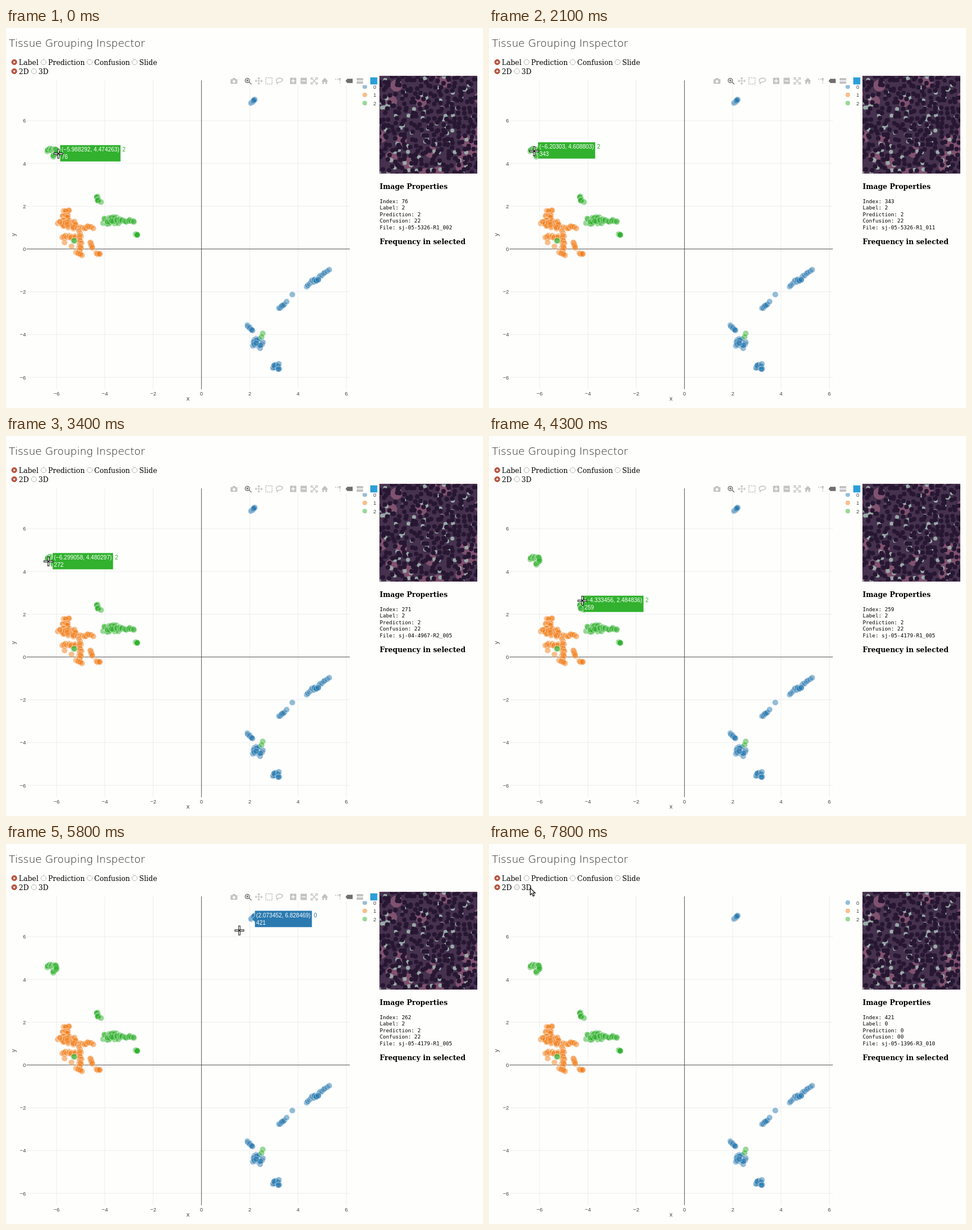
An HTML page that plays this animation: 838x668 px, repeating every 8000 ms.

```html
<!DOCTYPE html>
<html lang="en">
<head>
<meta charset="utf-8">
<title>Tissue Grouping Inspector</title>
<style>
html, body { margin: 0; width: 100%; height: 100%; overflow: hidden; background: #fefefd; }
svg { display: block; }
text { white-space: pre; }
.title { font: 200 18.4px "DejaVu Sans", sans-serif; fill: #222; }
.label { font: 12.3px "DejaVu Serif", serif; }
.head { font: bold 12.3px "DejaVu Serif", serif; }
.mono { font: 9.2px "DejaVu Sans Mono", monospace; }
.tick { font: 9.4px "Liberation Sans", Arial, sans-serif; fill: #444; }
.axis { font: 10.8px "Liberation Sans", Arial, sans-serif; fill: #444; }
.tip { font: 10px "Liberation Sans", Arial, sans-serif; }
</style>
</head>
<body>
<svg id="stage" width="838" height="668" viewBox="0 0 838 668"></svg>
<script>
const stage = document.getElementById('stage');
const GREEN = '#31b12e', ORANGE = '#f27f1c', BLUE = '#2a7ab0';
const COLORS = [BLUE, ORANGE, GREEN];

function add(parent, tag, attrs = {}, text) {
  const node = document.createElementNS('http://www.w3.org/2000/svg', tag);
  for (const key in attrs) node.setAttribute(key, attrs[key]);
  if (text !== undefined) node.textContent = text;
  parent.appendChild(node);
  return node;
}
const write = (parent, cls, x, y, text, more) =>
  add(parent, 'text', { class: cls, x, y, ...more }, text);
const line = (x1, y1, x2, y2, stroke) =>
  add(stage, 'line', { x1, y1, x2, y2, stroke, 'stroke-width': 0.9 });

function random(seed) {
  return () => {
    seed = (seed + 0x6D2B79F5) | 0;
    let v = Math.imul(seed ^ (seed >>> 15), 1 | seed);
    v = (v + Math.imul(v ^ (v >>> 7), 61 | v)) ^ v;
    return ((v ^ (v >>> 14)) >>> 0) / 4294967296;
  };
}

// Page header
write(stage, 'title', 5, 32.5, 'Tissue Grouping Inspector');
function radio(x, y, name, on) {
  const ring = add(stage, 'circle', {
    cx: x, cy: y, r: 4.6, fill: on ? '#bd5a45' : '#fbfbfa', stroke: on ? '#a8452f' : '#b4b2ae', 'stroke-width': 0.9
  });
  if (on) add(stage, 'circle', { cx: x, cy: y, r: 1.6, fill: '#fff' });
  write(stage, 'label', x + 8, y + 5, name);
  return ring;
}
radio(14.5, 60, 'Label', true);
radio(66, 60, 'Prediction');
radio(147, 60, 'Confusion');
radio(226, 60, 'Slide');
radio(14.5, 76, '2D', true);
const radio3d = radio(49, 76, '3D');

// Axes
const px = x => 343.4 + x * 42.43;
const py = y => 388.5 - y * 37.6;
const signed = n => String(n).replace('-', '−');
for (let v = -6; v <= 6; v += 2) {
  if (v) {
    line(px(v), 92, px(v), 635, '#ebebeb');
    line(36, py(v), 604, py(v), '#ebebeb');
  }
  write(stage, 'tick', px(v), 645.5, signed(v), { 'text-anchor': 'middle' });
  write(stage, 'tick', 35, py(v) + 3.4, signed(v), { 'text-anchor': 'end' });
}
line(px(0), 92, px(0), 635, '#444');
line(36, py(0), 604, py(0), '#444');
write(stage, 'axis', 319.8, 655, 'x', { 'text-anchor': 'middle' });
write(stage, 'axis', 0, 0, 'y', { transform: 'translate(16.5 366) rotate(-90)' });

// Markers: n points strewn along a line from x0, y0 to x1, y1
const rnd = random(11);
function strew(fill, lines) {
  const g = add(stage, 'g', { fill, stroke: '#fff', 'stroke-width': 0.8 });
  for (const [x0, y0, x1, y1, spread, n] of lines) {
    for (let i = 0; i < n; i++) {
      const f = i / (n - 1), a = rnd() * 2 * Math.PI, r = spread * Math.sqrt(rnd());
      add(g, 'circle', {
        cx: x0 + (x1 - x0) * f + r * Math.cos(a),
        cy: y0 + (y1 - y0) * f + r * Math.sin(a),
        r: 5.4, opacity: 0.5
      });
    }
  }
}
strew(BLUE, [
  [431, 132, 437, 126, 0.8, 8],
  [528, 454, 567, 426, 1.5, 14],
  [539, 444, 548, 441, 4, 14],
  [480, 493, 488, 486, 1, 8],
  [493, 481, 503, 468.5, 0, 2],
  [424, 523, 433, 532, 1, 9],
  [438, 553, 444, 557, 9, 23],
  [473, 595, 477, 595, 6, 15]
]);
strew(ORANGE, [
  [101, 322, 111, 322, 2, 6],
  [104, 326, 104, 342, 5, 20],
  [95, 342, 124, 348, 7, 30],
  [128, 351, 154, 350, 2.5, 11],
  [100, 367, 124, 366, 4, 14],
  [103, 377, 115, 384, 0, 2],
  [129, 358, 131, 396, 3, 22],
  [124, 394, 133, 399, 1, 4],
  [148, 376, 151, 386, 1, 6],
  [158, 396, 165, 397, 1, 6]
]);
strew(GREEN, [
  [73, 215, 89, 212, 2.5, 14],
  [83, 226, 88, 218, 2, 8],
  [160, 296, 161, 303, 2, 7],
  [161, 303, 167, 306, 0, 2],
  [176, 338, 193, 338, 8, 32],
  [195, 338, 224, 339, 2.5, 16],
  [228, 362, 231, 364, 0.8, 6],
  [119, 374, 120, 374, 0, 2],
  [451, 537, 449, 543, 0, 2]
]);

// Legend
COLORS.forEach((fill, i) => {
  add(stage, 'circle', { cx: 630.3, cy: 103 + i * 14.5, r: 4, fill, opacity: 0.5 });
  write(stage, 'tick', 645.3, 106.5 + i * 14.5, i);
});

// Toolbar
const GRAY = '#c3c3c3';
const bar = add(stage, 'g', { fill: 'none', stroke: GRAY, 'stroke-width': 1.5 });
add(bar, 'rect', { x: 392, y: 86, width: 262, height: 14.5, fill: '#fefefd', stroke: 'none' });
const icon = (x, d, more) => add(bar, 'path', { d, transform: `translate(${x} 93)`, ...more });
const block = (x, y, width, height, fill = GRAY) =>
  add(bar, 'rect', { x, y, width, height, fill, stroke: 'none' });
block(394.5, 90, 12, 8);
block(398, 88, 5, 3);
add(bar, 'circle', { cx: 400.5, cy: 94, r: 2.4, fill: '#fefefd', stroke: 'none' });
add(bar, 'circle', { cx: 424, cy: 92.2, r: 3.8, stroke: '#777' });
icon(425, 'M2 2L6 6M-3-.8h4M-1-2.8v4', { stroke: '#777' });
icon(444, 'M-6 0H6M0-6V6M-2-4L0-6L2-4M-2 4L0 6L2 4M-4-2L-6 0L-4 2M4-2L6 0L4 2', { 'stroke-width': 1.2 });
icon(462, 'M-5.5-5.5h11v11h-11z', { 'stroke-dasharray': '2.4 1.2' });
icon(480, 'M-3 3C-8-1-4-5 1-5S7-1 4 1S-2 2-3 3q-2 1 0 3');
block(499, 87.5, 11, 11);
icon(504.5, 'M-3.5 0h7M0-3.5v7', { stroke: '#fff' });
block(517.5, 87.5, 11, 11);
icon(523, 'M-3.5 0h7', { stroke: '#fff' });
icon(541.5, 'M-5.5-2v-3.5h3.5M2-5.5h3.5v3.5M5.5 2v3.5h-3.5M-2 5.5h-3.5v-3.5M-4-4L4 4M4-4L-4 4');
icon(560, 'M0-5.5L6 .5H4.2V5.5H1.3V2h-2.6v3.5h-2.9V.5H-6z', { fill: GRAY, stroke: 'none' });
icon(583, 'M-5-3H2M3.5-1V5', { 'stroke-dasharray': '2 1.4' });
block(584.5, 88, 3.5, 3.5);
icon(603, 'M-6.5 0l3-3.7h9.5v7.4h-9.5z', { fill: '#6f6f6f', stroke: 'none' });
block(616, 88, 11.5, 4.2);
block(616, 93.8, 11.5, 4.2);
block(640, 86.8, 12.3, 12.4, '#2b9fd9');

// Side panel pictures: [base, gaps, warm, cells, share of cells]
const TONES = [
  ['#54396a', '#b2bcc4', '#8a4a66', '#352047', 0.86],
  ['#573660', '#a4acba', '#95465f', '#351f47', 0.9],
  ['#543560', '#a4a6ba', '#8d4a66', '#341e45', 0.9],
  ['#6a4664', '#98a5b0', '#94607b', '#2f1c3e', 0.78],
  ['#674a68', '#9fb4b8', '#a56678', '#38233f', 0.86],
  ['#76485c', '#a39ba4', '#b06d76', '#3d2340', 0.76],
  ['#46324f', '#99aba9', '#805270', '#271732', 0.9]
];
const photos = TONES.map(([base, gaps, warm, cells, share], k) => {
  const r = random(50 + k);
  const box = add(stage, 'svg', { x: 656.5, y: 84.5, width: 171.5, height: 171 });
  add(box, 'rect', { width: 172, height: 172, fill: base });
  const dots = (step, stroke, width, odds) => {
    let d = '';
    for (let y = 0; y < 176; y += step)
      for (let x = 0; x < 176; x += step) {
        const dx = (r() - 0.5) * step * 0.9, dy = (r() - 0.5) * step * 0.9;
        if (r() < odds) d += `M${(x + dx).toFixed(1)} ${(y + dy).toFixed(1)}h.1`;
      }
    add(box, 'path', { d, stroke, 'stroke-width': width, 'stroke-linecap': 'round' });
  };
  dots(24, warm, 21, 0.5);
  dots(12, gaps, 7, 0.42);
  dots(9.2, cells, 8, share);
  return box;
});

write(stage, 'head', 656.5, 283, 'Image Properties');
const rows = Array.from({ length: 5 }, (_, i) => write(stage, 'mono', 656.5, 307.7 + i * 11.5, ''));
write(stage, 'head', 656.5, 380, 'Frequency in selected');

// Hover label
const tip = add(stage, 'g');
const tipBox = add(tip, 'path', { stroke: '#fff', 'stroke-width': 0.7 });
const tipPos = write(tip, 'tip', 8.2, -3.2, '', { fill: '#fff' });
const tipId = write(tip, 'tip', 8.2, 9.9, '', { fill: '#fff' });
const tipName = write(tip, 'tip', 0, -3.2, '');

// Pointers
const cross = add(stage, 'g', { fill: 'none', 'stroke-linecap': 'square' });
const arms = 'M-6.6 0H-2.4M2.4 0H6.6M0-6.6V-2.4M0 2.4V6.6';
add(cross, 'path', { d: arms, stroke: '#111', 'stroke-width': 3.6 });
add(cross, 'path', { d: arms, stroke: '#fff', 'stroke-width': 1.7 });
add(cross, 'circle', { r: 0.9, fill: '#111' });
const arrow = add(stage, 'path', {
  d: 'M.5.5V12.5L3.4 10L5.4 14.6L7.6 13.6L5.6 9.2H9.3Z', fill: '#fff', stroke: '#111', 'stroke-width': 1.2
});

// Timeline
const LOOP = 8000, STEP = 100;
// Pointer moves: [from time, to time, x, y]
const MOVES = [
  [0, 0, 92, 221], [400, 900, 80, 226], [1700, 2100, 79.5, 216.5], [2600, 3000, 76, 227],
  [3100, 3200, 74.5, 220.5], [3400, 3500, 93, 219], [3600, 3800, 174, 253], [3900, 4300, 164, 289.5],
  [4400, 4800, 161, 301.5], [4800, 4900, 161, 306], [5100, 5200, 162, 311], [5300, 5400, 174, 303],
  [5400, 5800, 410, 152], [5800, 6100, 433, 132], [6500, 6900, 190, 100], [6900, 7200, 76, 78],
  [7600, 7800, 72, 77]
];
// Hover labels: [time, x, y, index, label]
const TIPS = [
  [0, -5.988292, 4.474263, 76, 2], [700, -6.135417, 4.338912, 318, 2], [1900, -6.20303, 4.608803, 343, 2],
  [2800, -6.299058, 4.480297, 271, 2], [3200, -6.299058, 4.480297, 272, 2], [3500],
  [4100, -4.333456, 2.484836, 259, 2], [4600, -4.296004, 2.370204, 252, 2],
  [4900, -4.281547, 2.274183, 262, 2], [5200, -4.276213, 2.271846, 262, 2], [5400],
  [5800, 2.073452, 6.828469, 421, 0], [6600]
];
const PROPS = [
  [0, 76, 2, '05-5326-R1_002'], [800, 318, 2, '05-5326-R1_004'], [2000, 343, 2, '05-5326-R1_011'],
  [2900, 271, 2, '04-4967-R2_005'], [3500, 272, 2, '04-4967-R2_005'], [4200, 259, 2, '05-4179-R1_005'],
  [4700, 252, 2, '05-4179-R1_005'], [4900, 262, 2, '05-4179-R1_005'], [6000, 421, 0, '05-1396-R3_010']
];
// [time, picture, height of the part already loaded, picture beneath]
const PICTURES = [
  [0, 0], [1900, 1], [2100, 2, 26, 1], [2500, 2], [3000, 3], [4300, 0], [4800, 4], [5400, 5], [6100, 6]
];

const at = (table, t) => table.findLast(row => row[0] <= t);
const show = (node, on) => node.setAttribute('display', on ? 'inline' : 'none');

function pointer(t) {
  let x = 0, y = 0;
  for (const [from, to, x1, y1] of MOVES) {
    if (t < from) break;
    const f = t >= to ? 1 : (t - from) / (to - from);
    x += (x1 - x) * f;
    y += (y1 - y) * f;
  }
  return [x, y];
}

function drawTip([, x, y, id, k]) {
  show(tip, id !== undefined);
  if (id === undefined) return;
  tip.setAttribute('transform', `translate(${px(x)} ${py(y)})`);
  tipPos.textContent = `(${signed(x)}, ${signed(y)})`;
  tipId.textContent = id;
  const right = 8.2 + tipPos.getComputedTextLength() + 2.6;
  tipBox.setAttribute('d', `M0 0L5.6-5V-14.7H${right}V14.7H5.6V5Z`);
  tipBox.setAttribute('fill', COLORS[k]);
  tipName.textContent = k;
  tipName.setAttribute('x', right + 3);
  tipName.setAttribute('fill', COLORS[k]);
}

function draw(t) {
  drawTip(at(TIPS, t));

  const [, id, k, file] = at(PROPS, t);
  [`Index: ${id}`, `Label: ${k}`, `Prediction: ${k}`, `Confusion: ${k}${k}`, `File: sj-${file}`]
    .forEach((text, i) => { rows[i].textContent = text; });

  const [, top, height = 171, under] = at(PICTURES, t);
  photos.forEach((box, i) => {
    show(box, i === top || i === under);
    box.setAttribute('height', i === top ? height : 171);
  });
  if (under !== undefined) stage.insertBefore(photos[under], photos[top]);

  const pose = `translate(${pointer(t).join(' ')})`;
  const onPlot = t < 7100;
  cross.setAttribute('transform', pose);
  arrow.setAttribute('transform', pose);
  show(cross, onPlot);
  show(arrow, !onPlot);
  show(bar, t < 7200);
  radio3d.setAttribute('fill', t >= 7700 ? '#efeeec' : '#fbfbfa');
}

let last = -1;
function tick() {
  const t = Math.floor((performance.now() % LOOP) / STEP) * STEP;
  if (t !== last) draw(last = t);
  requestAnimationFrame(tick);
}
tick();
</script>
</body>
</html>
```
